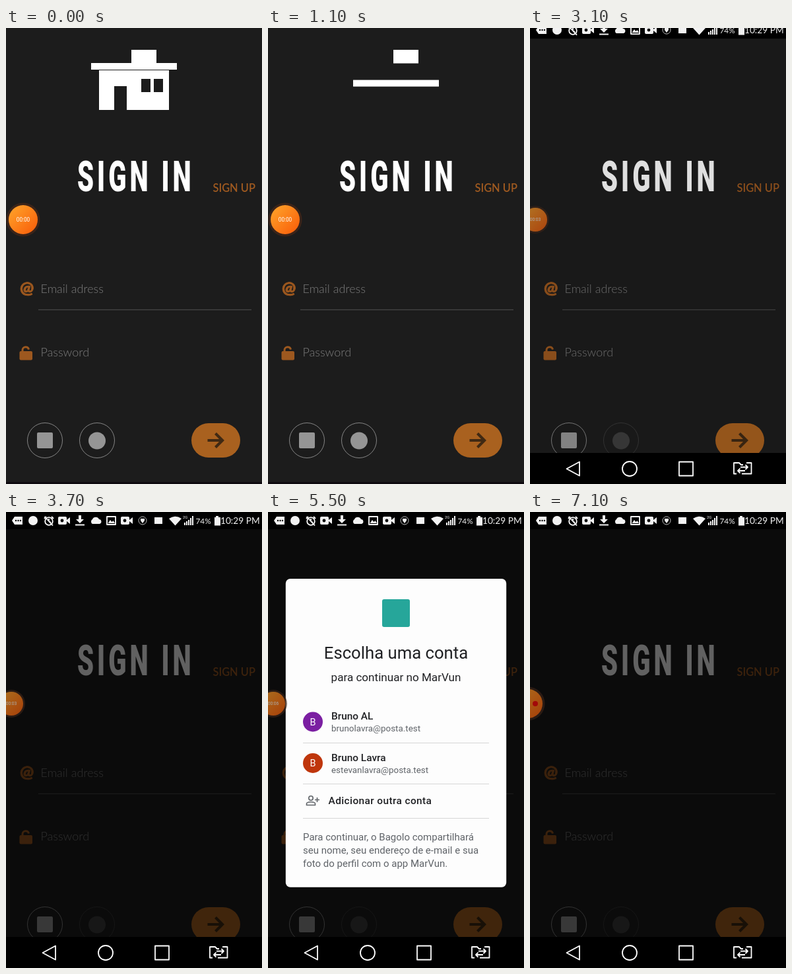
Recreate the animation shown at these times as an HTML page. Size 388 by 690 pixels, loop 8 s.

```html
<!DOCTYPE html>
<html lang="pt">
<head>
<meta charset="utf-8">
<title>Sign in</title>
<style>
html, body { margin: 0; width: 100%; height: 100%; overflow: hidden; background: #1c1c1c; }
svg { display: block; width: 388px; height: 690px; }
text { font-family: Roboto, sans-serif; }
.lato { font-family: Lato, sans-serif; }
.line { fill: none; stroke: #fff; stroke-width: 1.8; stroke-linejoin: round; }
.mid { text-anchor: middle; }
.name { font-size: 15.4px; font-weight: 500; fill: #202124; }
.mail { font-size: 13.4px; fill: #5f6368; }
.note { font-size: 15px; fill: #5f6368; }
</style>
</head>
<body>
<svg viewBox="0 0 388 690">
  <defs>
    <linearGradient id="glow" x1="0" y1="0" x2="1" y2="1">
      <stop offset="0" stop-color="#ffa62b"/>
      <stop offset="1" stop-color="#f95a08"/>
    </linearGradient>
    <clipPath id="row"><rect x="33" y="286" width="328" height="63"/></clipPath>
    <g id="camera"><rect x="-9" y="-6" width="13" height="12" rx="2"/><path d="M4 -1L9 -5V5L4 1Z"/><circle cx="-3" r="2.4" fill="#000"/></g>
  </defs>
  <rect width="388" height="690" fill="#1c1c1c"/>
  <rect y="687" width="388" height="3" fill="#0e0a0f"/>

  <g id="house" fill="#fff">
    <path id="walls" fill-rule="evenodd" d="M141 64H247V124H183V88H164V124H141ZM205 77V97H219V77ZM224 77V97H238V77Z"/>
    <rect id="roof" x="129" y="53" width="130" height="10"/>
    <rect id="chimney" x="190" y="33" width="38" height="20.5"/>
  </g>

  <text transform="translate(108 247) scale(.62 1)" font-size="64.7" font-weight="900" letter-spacing="8" fill="#fff">SIGN IN</text>
  <text class="lato" x="313.500" y="247.500" font-size="16.4" font-weight="600" fill="#a05a20">SIGN UP</text>

  <g fill="#9d581f">
    <text class="lato mid" x="31.5" y="402" font-size="25" font-weight="900" stroke="#9d581f" stroke-width=".7">@</text>
    <rect x="20.5" y="489" width="19.5" height="13.500" rx="2"/>
    <path d="M25 490V487A4.800 4.500 0 0 1 34.500 486.500" fill="none" stroke="#9d581f" stroke-width="3"/>
  </g>
  <g font-size="18" font-weight="300" fill="#7c7c7c">
    <text class="lato" x="52.500" y="401">Email adress</text>
    <text class="lato" x="52.500" y="496.500">Password</text>
  </g>
  <path d="M49 426.300H372" stroke="#505050"/>

  <g fill="none" stroke="#858585">
    <circle cx="59" cy="624" r="26.500"/>
    <rect x="47" y="612" width="24" height="24" rx="2" fill="#959595" stroke="none"/>
  </g>
  <g id="social" fill="none" stroke="#858585">
    <circle cx="138" cy="624" r="26.500"/>
    <circle cx="138" cy="624.500" r="13" fill="#959595" stroke="none"/>
  </g>
  <rect x="281" y="598" width="74" height="52" rx="26" fill="#a9611f"/>
  <path d="M305.500 624H327M317.500 613.500L328 624L317.500 634.500" fill="none" stroke="#402913" stroke-width="4.200"/>

  <rect id="dim" width="388" height="690"/>

  <g id="dialog">
    <rect x="26.800" y="101" width="334.400" height="466.800" rx="7" fill="#fdfdfd"/>
    <g clip-path="url(#row)"><circle id="ripple" cx="190" cy="318" fill="#f8f8f8"/></g>
    <rect x="173" y="132" width="42" height="42" rx="3" fill="#26a69a"/>
    <text class="mid" x="194" y="221.500" font-size="25.700" fill="#202124">Escolha uma conta</text>
    <text class="mid" x="194" y="255.500" font-size="17.100" fill="#202124">para continuar no MarVun</text>
    <circle cx="68" cy="317.500" r="15" fill="#7b1fa2"/>
    <circle cx="68" cy="380" r="15" fill="#bf360c"/>
    <g class="mid" font-size="14.500" fill="#fff">
      <text x="68" y="322.500">B</text>
      <text x="68" y="385">B</text>
    </g>
    <text class="name" x="96" y="314">Bruno AL</text>
    <text class="mail" x="96" y="332">brunolavra@posta.test</text>
    <text class="name" x="96" y="376.500">Bruno Lavra</text>
    <text class="mail" x="96" y="394.500">estevanlavra@posta.test</text>
    <g fill="none" stroke="#5f6368" stroke-width="1.600">
      <circle cx="65" cy="433" r="3.200"/>
      <path d="M58.500 443.500V441.500C58.500 437.800 71.500 437.800 71.500 441.500V443.500ZM71 435.500H78M74.500 432V439"/>
    </g>
    <text class="name" x="91.500" y="442" letter-spacing=".4">Adicionar outra conta</text>
    <path d="M53 349.500H335M53 411.500H335M53 463.500H335" stroke="#d6d6d6"/>
    <text class="note" x="53" y="497">Para continuar, o Bagolo compartilhará</text>
    <text class="note" x="53" y="517">seu nome, seu endereço de e-mail e sua</text>
    <text class="note" x="53" y="537">foto do perfil com o app MarVun.</text>
  </g>

  <g id="widget">
    <circle r="25.500" fill="#3b2419"/>
    <circle r="22" fill="url(#glow)"/>
    <text id="clock" class="mid" y="3" font-size="8.200" fill="#fff"></text>
    <circle id="rec" cx="11" r="4" fill="#f00808"/>
  </g>

  <g id="status">
    <rect width="388" height="26"/>
    <g fill="#f2f2f2">
      <path d="M9 13L13 7H25V19H13Z"/>
      <g fill="#000"><circle cx="15" cy="13" r="1.200"/><circle cx="18.500" cy="13" r="1.200"/><circle cx="22" cy="13" r="1.200"/></g>
      <circle cx="41" cy="13" r="7"/>
      <g class="line"><circle cx="65" cy="14" r="5.800"/><path d="M65 10V14L68 16M58 10L61 7M72 10L69 7M58.500 7L71 20.500"/></g>
      <use href="#camera" x="88" y="13"/>
      <path d="M110 5H114V11H118L112 17L106 11H110ZM105 18.500H119V20.500H105Z"/>
      <path d="M131 18A4 4 0 0 1 131 11A5.500 5.500 0 0 1 141 11A3.600 3.600 0 0 1 142 18Z"/>
      <rect class="line" x="153" y="7" width="13" height="12"/><path d="M154.500 17L158 12L160.500 15L162.500 13L165 17Z"/>
      <use href="#camera" x="183" y="13"/>
      <circle cx="207" cy="13" r="6" fill="none" stroke="#bbb"/><path d="M204 10H210V13L207 17L204 13Z"/>
      <rect x="225" y="8" width="12" height="10"/>
      <path d="M247 10Q256.500 3.500 266 10L256.500 20.500Z"/>
      <text x="268" y="10" font-size="6">2G</text>
      <path d="M270 16H272V20H270ZM273 14H275V20H273ZM276 12H278V20H276ZM279 9H281V20H279ZM282 6H284V20H282Z"/>
      <text class="lato" x="287.500" y="18" font-size="11.800">74%</text>
      <path d="M316 8H318V6H322V8H325V20.500H316Z"/>
      <text class="lato mid" x="354.800" y="18" font-size="13.700">10:29 PM</text>
    </g>
  </g>

  <g id="nav">
    <rect y="643" width="388" height="47"/>
    <g class="line">
      <path d="M75 656.500V677.500L55.500 667Z"/>
      <circle cx="151" cy="667" r="11"/>
      <rect x="226" y="656.500" width="21" height="21"/>
      <path d="M313 674.500H309V658H317L320 661H323M321 674.500H335.500V658H328"/>
      <path d="M319 664.500H330M326.500 661L330 664.500L326.500 668M326 670H315M318.500 666.500L315 670L318.500 673.500"/>
    </g>
  </g>
</svg>
<script>
const $ = id => document.getElementById(id);
const set = (id, attrs) => { for (const k in attrs) $(id).setAttribute(k, attrs[k]); };
const prog = (t, a, b) => Math.min(1, Math.max(0, (t - a) / (b - a)));
const smooth = p => p * p * (3 - 2 * p);
const mix = (a, b, p) => a + (b - a) * p;
const LOOP = 8000;

// Rises from below, overshoots, then settles.
function piece(id, t, start) {
  const y = 70 - 80 * prog(t, start, start + 200) + 10 * smooth(prog(t, start + 200, start + 350));
  set(id, { transform: `translate(0 ${y})`, opacity: prog(t, start, start + 60) });
}

function house(t) {
  const build = t < 600 ? 1480 - Math.max(0, t - 99) * 1.7 : t;
  piece('chimney', build, 700);
  piece('roof', build, 990);
  piece('walls', build, 1130);
  set('house', { opacity: t < 2950 ? 1 : 0 });
}

function widget(t) {
  const tuck = smooth(prog(t, 1800, 2400));
  const open = smooth(prog(t, 6400, 6700));
  const x = mix(mix(26, 8, tuck), -3, open);
  const size = mix(mix(1, .82, tuck), 1, open);
  set('widget', { transform: `translate(${x} 290) scale(${size})`, opacity: mix(1, .66, tuck) });
  const sec = t < 1800 ? 0 : t < 2900 ? 2 : t < 4500 ? 3 : t < 5450 ? 4 : 6;
  $('clock').textContent = '00:0' + sec;
  set('clock', { opacity: t < 6400 ? 1 : 0 });
  set('rec', { opacity: t < 6400 ? 0 : 1 });
}

function draw(t) {
  house(t);
  widget(t);
  set('social', { opacity: mix(1, .28, prog(t, 2850, 3000)) });
  set('dim', { opacity: .62 * (.2 * prog(t, 3000, 3100) + .8 * prog(t, 3100, 3300)) });
  const slide = prog(t, 2880, 3100) * 16 + prog(t, 3100, 3300) * 10;
  set('status', { transform: `translate(0 ${slide - 26})` });
  set('nav', { transform: `translate(0 ${47 * (1 - smooth(prog(t, 2880, 3050)))})` });

  const show = smooth(prog(t, 5010, 5300));
  const size = mix(.92, 1, show);
  set('dialog', {
    opacity: show * (1 - prog(t, 6960, 7080)),
    transform: `translate(194 334) scale(${size}) translate(-194 -334)`
  });
  set('ripple', { r: 180 * smooth(prog(t, 6450, 6850)) });
}

const begin = performance.now();
function tick() {
  draw((performance.now() - begin) % LOOP);
  requestAnimationFrame(tick);
}
draw(0);
requestAnimationFrame(tick);
</script>
</body>
</html>
```
